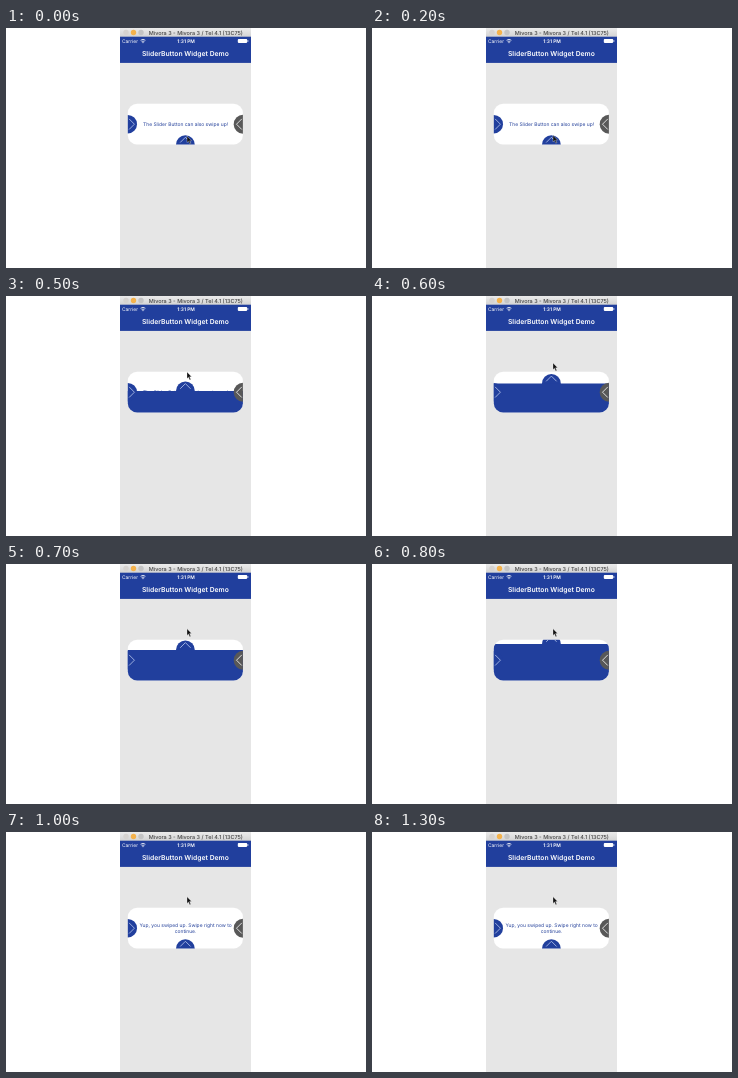
Recreate the animation shown at these times as an HTML page. Size 360x240 px, loop 1400 ms.

```html
<!DOCTYPE html>
<html lang="en">
<head>
<meta charset="utf-8">
<title>Slider button demo</title>
<style>
  html, body { margin: 0; width: 100%; height: 100%; overflow: hidden; background: #fff; }
  svg { display: block; width: 360px; height: 240px; }
  text { font-family: Inter, Roboto, sans-serif; text-anchor: middle; text-rendering: geometricPrecision; }
  .line { fill: none; stroke: #fff; stroke-width: .8; }
  .soft { stroke: #b9c8ee; }
  .blue { fill: #213f9d; }
  .note { font-size: 4.95px; fill: #24409a; }
  .bar { font-size: 4.9px; fill: #fff; }
</style>
</head>
<body>
<svg viewBox="0 0 360 240">
  <defs>
    <linearGradient id="chrome" x2="0" y2="1">
      <stop stop-color="#ebebeb"/><stop offset="1" stop-color="#d3d3d3"/>
    </linearGradient>
    <clipPath id="card"><rect x="121.8" y="75.7" width="115.1" height="40.8" rx="9.3"/></clipPath>
  </defs>

  <rect x="114" width="131" height="240" fill="#e6e6e6"/>
  <rect x="114" width="131" height="9" fill="url(#chrome)"/>
  <circle cx="120" cy="4.5" r="2.7" fill="#d6d3d0"/>
  <circle cx="127.5" cy="4.5" r="2.7" fill="#f4b24c"/>
  <circle cx="135" cy="4.5" r="2.7" fill="#c4c4c4"/>
  <text x="189.8" y="6.6" font-size="5.5" font-weight="500" fill="#444">Mivora 3 - Mivora 3 / Tel 4.1 (13C75)</text>

  <rect class="blue" x="114" y="8.7" width="131" height="26.2"/>
  <text class="bar" x="124" y="14.8">Carrier</text>
  <path class="line" d="M134.6 12.3q2.4-2 4.8 0M135.6 13.6q1.4-1.2 2.8 0"/>
  <circle cx="137" cy="14.6" r=".6" fill="#fff"/>
  <text class="bar" x="180" y="14.8" font-weight="600">1:31 PM</text>
  <rect x="231.8" y="11.1" width="9.4" height="3.8" rx=".8" fill="#fff"/>
  <rect x="241.5" y="12.2" width=".8" height="1.6" fill="#fff"/>
  <text x="179.4" y="28.3" font-size="6.8" font-weight="600" fill="#fff">SliderButton Widget Demo</text>

  <g clip-path="url(#card)">
    <rect x="121" y="75" width="117" height="42" fill="#fff"/>
    <text class="note" id="before" x="179.6" y="98.3">The Slider Button can also swipe up!</text>
    <g id="after">
      <text class="note" x="179.6" y="95.1">Yup, you swiped up. Swipe right now to</text>
      <text class="note" x="179.6" y="101.1">continue.</text>
    </g>
    <g id="panel">
      <circle class="blue" cx="179.4" r="9.4"/>
      <rect class="blue" x="121" width="117" height="45"/>
      <path class="line soft" d="M174.2-2.2l5.2-5.2 5.2 5.2"/>
    </g>
    <circle class="blue" cx="121.7" cy="96.2" r="9.3"/>
    <path class="line soft" d="M123.1 90.9l5.3 5.3-5.3 5.3"/>
    <circle cx="237.2" cy="96.2" r="9.5" fill="#585858"/>
    <path class="line" d="M235.8 90.9l-5.3 5.3 5.3 5.3"/>
  </g>

  <path id="cursor" d="M0 0v6.6l1.5-1.4 1.2 2.7 1.1-.5-1.2-2.6h2z"
        fill="#111" stroke="#fff" stroke-width=".3"/>
</svg>
<script>
const LOOP = 1400, STEP = 100, REST = 116.7;
const panelKeys = [[0, REST], [400, REST], [500, 95], [600, 87.5], [700, 86], [800, 80], [900, 75.5]];
const cursorKeys = [[0, 108], [300, 107], [400, 104], [500, 76], [600, 67], [700, 64.8]];
const el = id => document.getElementById(id);

function valueAt(keys, t) {
  const i = keys.findIndex(k => k[0] > t);
  if (i < 0) return keys[keys.length - 1][1];
  const [t0, a] = keys[i - 1], [t1, b] = keys[i];
  return a + (b - a) * (t - t0) / (t1 - t0);
}

function draw(now) {
  const t = Math.floor(now % LOOP / STEP) * STEP;
  const done = t >= 1000;
  const level = done ? REST : valueAt(panelKeys, t);
  el('panel').setAttribute('transform', `translate(0 ${level})`);
  el('cursor').setAttribute('transform', `translate(181 ${valueAt(cursorKeys, t)})`);
  el('before').style.display = done ? 'none' : '';
  el('after').style.display = done ? '' : 'none';
}

const start = performance.now();
function tick() {
  draw(performance.now() - start);
  requestAnimationFrame(tick);
}
tick();
</script>
</body>
</html>
```
